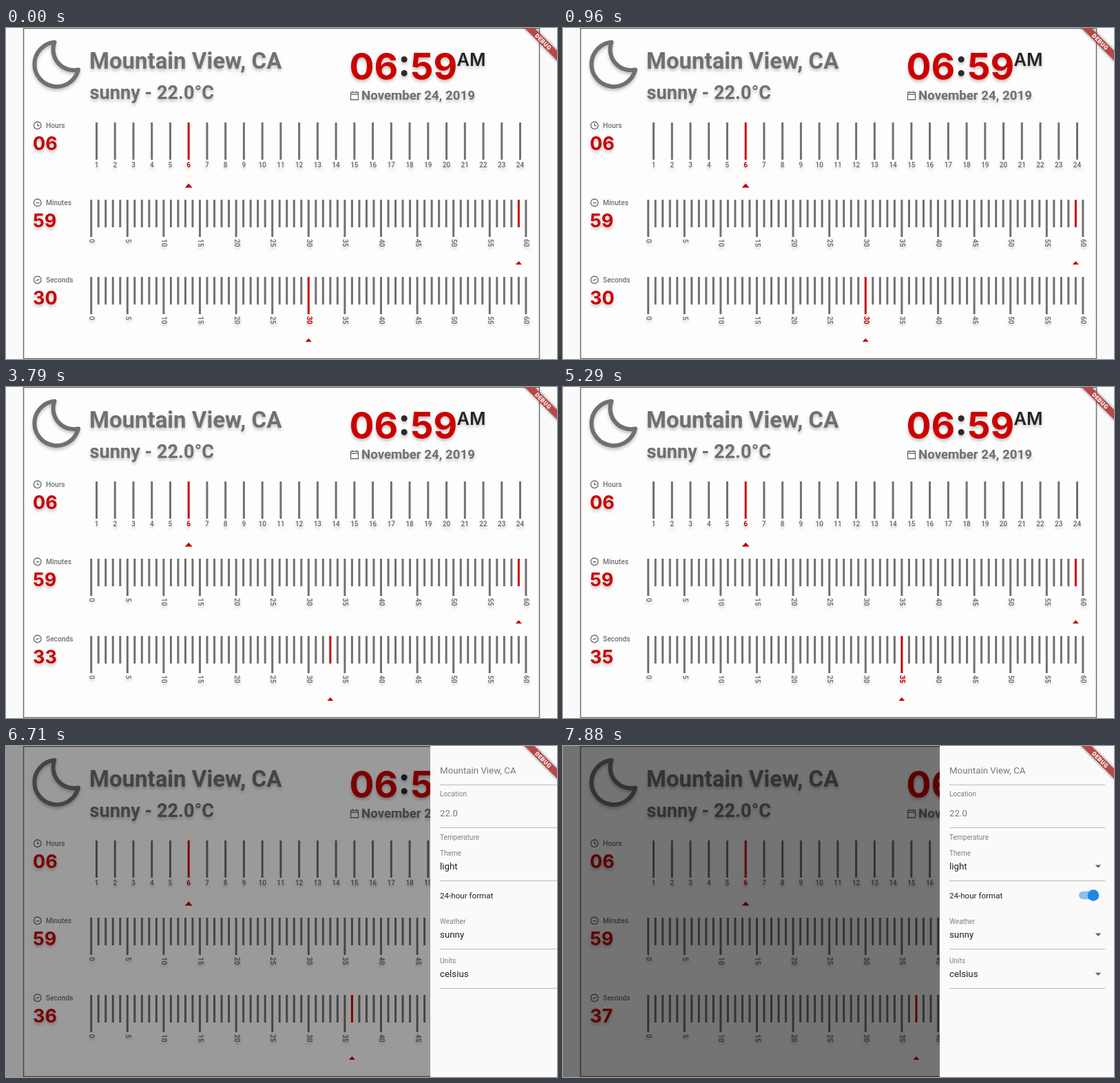
Recreate the animation shown at these times as an HTML page. Size 800 by 480 pixels, loop 8 s.

```html
<!DOCTYPE html>
<html lang="en">
<head>
<meta charset="utf-8">
<title>Linear clock</title>
<style>
  html, body { margin: 0; width: 100%; height: 100%; overflow: hidden; background: #fafafa; }
  svg { display: block; width: 100vw; height: 100vh; }
  text { font-family: Roboto, Inter, sans-serif; white-space: pre; }
  .bold { font-weight: 700; fill: #707070; }
  .num { font-family: Inter, Roboto, sans-serif; font-weight: 700; fill: #cc0000; }
  .mark { font-weight: 500; font-size: 10px; fill: #686868; }
  .label { font-weight: 500; font-size: 10.2px; fill: #707070; }
  .shade { filter: drop-shadow(0 3px 2px rgba(0, 0, 0, .24)); }
  .icon { fill: none; stroke: #686868; stroke-width: 1.3; }
  .tick { stroke: #707070; stroke-width: 3; }
  .tick.on { stroke: #cc0000; }
  .mark.on { fill: #cc0000; font-weight: 700; }
  .pointer { fill: #c00000; }
  .hint { font-size: 10.1px; fill: #808080; }
  .field { font-size: 13.3px; fill: #787878; }
  .value { font-size: 13.3px; fill: #212121; }
  .rule { stroke: #b8b8b8; stroke-width: 1; }
</style>
</head>
<body>
<svg id="stage" viewBox="0 0 800 480" preserveAspectRatio="none">
  <rect width="800" height="480" fill="#fafafa"/>
  <rect x="25.5" y=".5" width="749" height="479" fill="#fdfdfd" stroke="#707070" stroke-width="1.5"/>

  <g class="shade">
    <path d="M70.5 20.5A32.3 32.3 0 1 0 105 60.5A30 30 0 0 1 70.5 20.5Z" fill="none" stroke="#707070" stroke-width="6" stroke-linejoin="round"/>
    <text class="bold" x="121" y="59" font-size="33">Mountain View, CA</text>
    <text class="bold" x="121.5" y="103" font-size="27.2">sunny - 22.0°C</text>
    <text class="num" x="498.5" y="75" font-size="53.5">06<tspan fill="#2b2b2b">:</tspan>59</text>
    <text class="num" x="654.5" y="54.5" font-size="25.5" style="font-weight:600;fill:#242424">AM</text>
    <text class="bold" x="516" y="104" font-size="18.7" style="font-weight:600">November 24, 2019</text>
  </g>
  <path class="icon" d="M500.5 93.5h11v10.5h-11zM500.5 96.3h11M503 91.5v2M509 91.5v2"/>

  <g id="scales"></g>
  <rect id="scrim" width="800" height="480"/>
  <g id="drawer"><rect width="253" height="480" fill="#fafafa"/></g>

  <defs>
    <filter id="soft" x="-30%" y="-100%" width="160%" height="300%"><feGaussianBlur stdDeviation="2.6"/></filter>
  </defs>
  <g transform="translate(800 0) rotate(45) scale(.832)">
    <rect x="-50" y="28" width="100" height="12" opacity=".5" filter="url(#soft)"/>
    <rect x="-50" y="28" width="100" height="12" fill="#b84848"/>
    <text y="37.6" text-anchor="middle" font-size="10.2" font-weight="900" letter-spacing=".6" fill="#fff">DEBUG</text>
  </g>
</svg>
<script>
const LOOP = 8000;
const DRAWER_WIDTH = 253;
const DRAWER_OPENS = 6596, DRAWER_SETTLED = 6920;
const SPRING = 22.36; // critically damped, stiffness 500
const SCRIM_OPACITY = .54;
const SECOND_CHANGES = [1080, 2250, 3250, 4250, 5080, 6250, 7250];

const byId = id => document.getElementById(id);
const scales = byId('scales'), drawer = byId('drawer'), scrim = byId('scrim');

function add(parent, tag, attrs, text) {
  const el = document.createElementNS('http://www.w3.org/2000/svg', tag);
  for (const name in attrs) el.setAttribute(name, attrs[name]);
  if (text !== undefined) el.textContent = text;
  parent.append(el);
  return el;
}

function makeScale({ name, top, first, last, x0, step, hands, upright }) {
  const group = add(scales, 'g', { transform: `translate(0 ${top})` });
  add(group, 'circle', { class: 'icon', cx: 45.7, cy: 4.3, r: 5.3 });
  add(group, 'path', { class: 'icon', d: hands });
  add(group, 'text', { class: 'label', x: 58, y: 7.8 }, name);
  const shaded = add(group, 'g', { class: 'shade' });
  const number = add(shaded, 'text', { class: 'num', x: 39, y: 40, 'font-size': 27 });
  const marks = add(group, 'g', { class: 'shade' });
  const xOf = i => x0 + (i - first) * step;
  const parts = [];

  for (let i = first; i <= last; i++) {
    const x = xOf(i), long = upright || i % 5 === 0;
    const tick = add(group, 'line', { x1: x, x2: x, y1: 0, y2: long ? 54 : 40 });
    const place = upright
      ? { x, y: 65, 'text-anchor': 'middle' }
      : { transform: `translate(${x - 2.6} 57) rotate(90)` };
    parts[i] = { tick, mark: long && add(marks, 'text', place, i) };
  }
  const pointer = add(group, 'path', {
    class: 'pointer',
    d: upright ? 'M-5.5 94.5L0 88.5L5.5 94.5Z' : 'M-4.5 94L0 89L4.5 94Z'
  });

  return value => {
    number.textContent = String(value).padStart(2, '0');
    pointer.setAttribute('transform', `translate(${xOf(value)} 0)`);
    parts.forEach(({ tick, mark }, i) => {
      const on = i === value ? ' on' : '';
      tick.setAttribute('class', 'tick' + on);
      if (mark) mark.setAttribute('class', 'mark' + on);
    });
  };
}

const sixty = { first: 0, last: 60, x0: 123.7, step: 10.52 };
makeScale({ name: 'Hours', top: 137, first: 1, last: 24, x0: 131.5, step: 26.74,
  hands: 'M45.7 1.2V4.6H48.5', upright: true })(6);
makeScale({ ...sixty, name: 'Minutes', top: 249, hands: 'M43.5 4.6H48.5' })(59);
const setSeconds = makeScale({ ...sixty, name: 'Seconds', top: 361, hands: 'M43.2 5.5L45.7 4.4L48.3 3.4' });

const write = (cls, y, text) => add(drawer, 'text', { class: cls, x: 14, y }, text);
const rule = y => add(drawer, 'line', { class: 'rule', x1: 14, x2: 240, y1: y, y2: y });

write('field', 39.8, 'Mountain View, CA');
rule(56.5);
write('hint', 73.3, 'Location');
write('field', 101.8, '22.0');
rule(118.5);
write('hint', 135.5, 'Temperature');
for (const [y, title, choice] of [[158.6, 'Theme', 'light'], [257.8, 'Weather', 'sunny'], [315, 'Units', 'celsius']]) {
  write('hint', y, title);
  write('value', y + 20, choice);
  add(drawer, 'path', { d: `M225.7 ${y + 13.8}h8.6l-4.3 4.3z`, fill: '#666' });
  rule(Math.floor(y + 36.4) + .5);
}
write('value', 220.6, '24-hour format').style.fontSize = '11.6px';
add(drawer, 'rect', { x: 202, y: 210.7, width: 28, height: 11.6, rx: 5.8, fill: '#8cc1f0' });
add(drawer, 'circle', { cx: 223, cy: 216.5, r: 8.3, fill: '#1e88e5' });

function openness(t) {
  if (t <= DRAWER_OPENS) return 0;
  if (t >= DRAWER_SETTLED) return 1;
  const p = SPRING * (t - DRAWER_OPENS) / 1000;
  return 1 - (1 + p) * Math.exp(-p);
}

let shownSecond;
function render(t) {
  const second = 30 + SECOND_CHANGES.filter(at => t >= at).length;
  if (second !== shownSecond) setSeconds(shownSecond = second);

  const open = openness(t);
  drawer.setAttribute('transform', `translate(${800 - DRAWER_WIDTH * open} 0)`);
  scrim.setAttribute('opacity', SCRIM_OPACITY * open);
}

const start = performance.now();
function frame() {
  render((performance.now() - start) % LOOP);
  requestAnimationFrame(frame);
}
frame();
</script>
</body>
</html>
```
